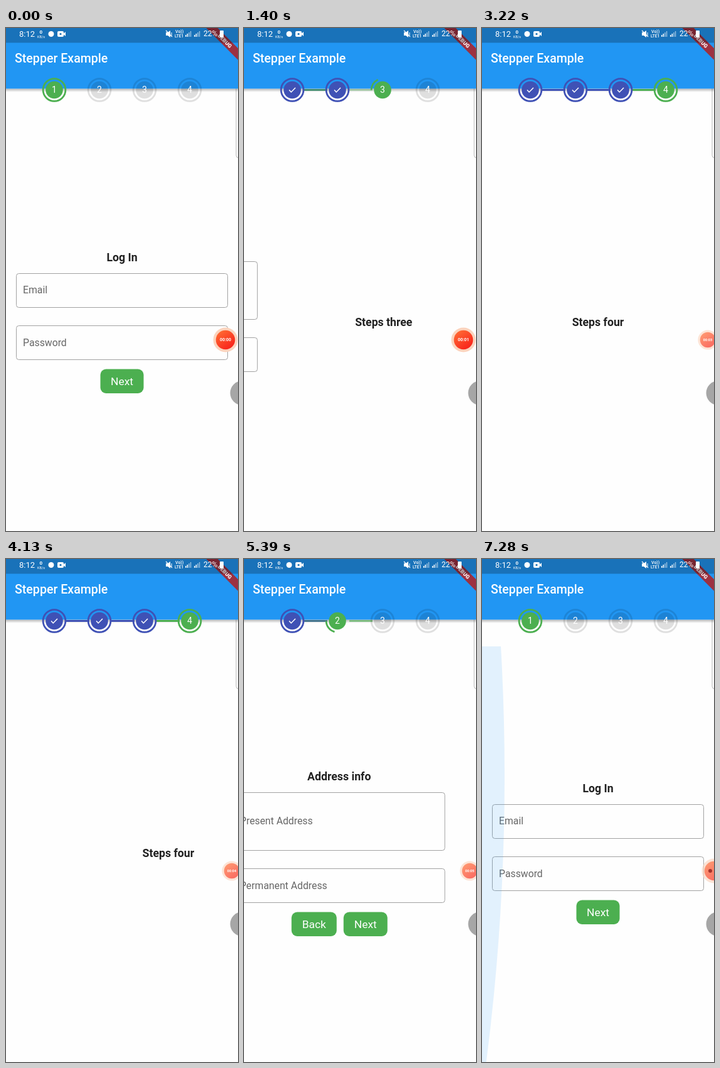
Write an HTML page with a canvas that moves like this. It is 370 px wide and 800 px high and loops after 7350 ms.

```html
<!DOCTYPE html>
<html lang="en">
<head>
<meta charset="utf-8">
<title>Stepper Example</title>
<style>
html, body { margin: 0; width: 100%; height: 100%; overflow: hidden; background: #fefefe; }
canvas { display: block; width: 370px; height: 800px; }
</style>
</head>
<body>
<canvas id="stage"></canvas>
<script>
const W = 370, H = 800, LOOP = 7350, STEP = 70;
const GREEN = '#4caf50', INDIGO = '#3f51b5', BLUE = '#2196f3', IDLE = 'rgba(0,0,0,.12)';
const STEP_Y = 98.5, RING_TIME = 550, LINE_TIME = 300, DRAG_TIME = 250;

// Page swipes: time the halfway point is passed, direction, settling constant
const swipes = [
  [615, 1, 22], [1300, 1, 63], [2030, 1, 63],
  [4222, -1, 63], [5275, -1, 67], [6080, -1, 80]
];
// Overscroll glows: start, time to peak, fade time, on the right edge
const glows = [[2430, 330, 400, true], [3200, 330, 400, true], [6960, 320, 500, false]];

const canvas = document.getElementById('stage');
const c = canvas.getContext('2d');
const dpr = window.devicePixelRatio || 1;
canvas.width = W * dpr;
canvas.height = H * dpr;

const clamp = x => Math.max(0, Math.min(1, x));
const smooth = x => { x = clamp(x); return x * x * (3 - 2 * x); };

function text(s, x, y, size, weight = 400, color = '#fff', align = 'left') {
  c.font = `${weight} ${size}px Roboto, sans-serif`;
  c.fillStyle = color;
  c.textAlign = align;
  c.fillText(s, x, y + size * 0.355);
}

function rect(x, y, w, h, color) {
  c.fillStyle = color;
  c.fillRect(x, y, w, h);
}

function disc(x, y, r, color) {
  c.fillStyle = color;
  c.beginPath();
  c.arc(x, y, r, 0, 7);
  c.fill();
}

function path(points, color, width) {
  c.beginPath();
  points.forEach(([x, y]) => c.lineTo(x, y));
  if (width) {
    c.strokeStyle = color;
    c.lineWidth = width;
    c.stroke();
  } else {
    c.fillStyle = color;
    c.fill();
  }
}

function box(x, y, w, h, r) {
  c.beginPath();
  c.roundRect(x, y, w, h, r);
}

function heading(s, y) {
  text(s, 185, y, 17.7, 700, '#212121', 'center');
}

function field(label, y, h, labelY) {
  c.strokeStyle = '#a2a2a2';
  c.lineWidth = 1;
  box(16.5, y + 0.5, 337, h, 4);
  c.stroke();
  text(label, 27, labelY, 15.8, 400, '#666');
}

function button(label, x, y, w) {
  c.fillStyle = GREEN;
  box(x, y, w, 38.5, 9);
  c.fill();
  text(label, x + w / 2, y + 19, 17.4, 400, '#fff', 'center');
}

const pages = [
  () => {
    heading('Log In', 365);
    field('Email', 390, 54, 416);
    field('Password', 473, 54, 500);
    button('Next', 150.5, 542.5, 69);
  },
  () => {
    heading('Address info', 346);
    field('Present Address', 371, 92, 416);
    field('Permanent Address', 492, 54, 519);
    button('Back', 109, 561.5, 72);
    button('Next', 192, 561.5, 70);
  },
  () => heading('Steps three', 468),
  () => heading('Steps four', 468)
];

function pagePosition(t) {
  return swipes.reduce((pos, [mid, dir, tau]) => {
    const part = t < mid
      ? 0.5 * clamp((t - mid + DRAG_TIME) / DRAG_TIME) ** 2
      : 1 - 0.5 * Math.exp((mid - t) / tau);
    return pos + dir * part;
  }, 0);
}

function drawPages(t) {
  const pos = pagePosition(t);
  pages.forEach((page, i) => {
    const x = (i - pos) * W;
    if (Math.abs(x) >= W) return;
    c.save();
    c.translate(x, 0);
    page();
    c.restore();
  });
}

function drawGlow(t) {
  for (const [start, rise, fade, right] of glows) {
    const age = t - start;
    const k = age < rise ? smooth(age / rise) : 1 - smooth((age - rise) / fade);
    if (age <= 0 || k <= 0) continue;
    c.save();
    c.beginPath();
    c.rect(0, 139, W, H - 139);
    c.clip();
    if (right) {
      c.translate(W, 0);
      c.scale(-1, 1);
    }
    c.scale(k, 1);
    disc(36 - 3557, 345, 3557, `rgba(33,150,243,${0.125 * k})`);
    c.restore();
  }
}

function drawStatus() {
  rect(0, 0, W, 23.5, 'rgba(0,0,0,.24)');
  text('8:12', 21, 9, 13);
  text('0', 53.5, 6, 8, 700);
  text('KB/s', 50, 14, 5.5);
  disc(72, 9.5, 4.5, '#fff');
  c.fillStyle = '#fff';
  box(82, 5, 10, 9, 2);
  c.fill();
  path([[91, 9.5], [95, 6], [95, 13]], '#fff');
  disc(87, 9.5, 1.6, '#1a72b5');
  path([[255, 7], [258, 7], [262, 4], [262, 15], [258, 12], [255, 12]], '#fff');
  path([[255, 4], [265, 14]], '#fff', 1.2);
  path([[264, 7], [264, 12]], '#fff', 1);
  text('Vo))', 270, 6, 7, 500);
  text('LTE1', 269, 13, 6.5, 500);
  for (const x of [286, 300])
    for (let i = 0; i < 4; i++)
      rect(x + i * 2.6, 11 - i * 2, 1.5, 3 + i * 2, i < 2 ? '#fff' : 'rgba(255,255,255,.55)');
  text('22%', 315, 9, 12);
  c.fillStyle = '#fff';
  box(341, 4, 6, 11, 1);
  c.fill();
}

function drawBanner() {
  c.save();
  c.translate(349, 20.5);
  c.rotate(Math.PI / 4);
  rect(-50, -6.5, 100, 13, 'rgba(170,38,46,.9)');
  text('DEBUG', 0, 0, 8.5, 900, '#fff', 'center');
  c.restore();
}

function drawBar() {
  c.strokeStyle = '#b8b8b8';
  c.lineWidth = 1;
  box(367, 90, 20, 116.5, 4);
  c.stroke();

  const shade = c.createLinearGradient(0, 96.5, 0, 102);
  shade.addColorStop(0, 'rgba(0,0,0,.28)');
  shade.addColorStop(1, 'rgba(0,0,0,0)');
  rect(0, 96.5, W, 5.5, shade);
  rect(0, 0, W, 96.5, BLUE);
  text('Stepper Example', 14, 48, 19.6, 500);
  drawBanner();
  drawStatus();
}

// Colour of a connecting line as [r, g, b, a]
function lineColor(line, step) {
  if (step <= line) return [76, 175, 80, 0];
  return step === line + 1 ? [76, 175, 80, 1] : [63, 81, 181, 1];
}

function ring(x, color, from, sweep) {
  c.strokeStyle = color;
  c.lineWidth = 2.8;
  c.beginPath();
  c.arc(x, STEP_Y, 17.9, from, from + sweep, sweep < 0);
  c.stroke();
}

function drawStepper(t) {
  let step = 0, prev = 0, since = -1e4, dir = 1;
  for (const [mid, d] of swipes) {
    if (t < mid) break;
    prev = step;
    step += d;
    since = mid;
    dir = d;
  }
  const mix = clamp((t - since) / LINE_TIME);
  const sweep = dir * Math.PI * 2 * clamp((t - since) / RING_TIME);

  for (let i = 0; i < 4; i++) {
    const x = 77 + i * 72;
    if (i < 3) {
      const a = lineColor(i, prev), b = lineColor(i, step);
      rect(x + 19, 97, 37, 3, `rgba(${a.map((v, k) => v + (b[k] - v) * mix)})`);
    }
    const color = i < step ? INDIGO : i === step ? GREEN : IDLE;
    ring(x, color, Math.PI, i === step ? sweep : Math.PI * 2);
    disc(x, STEP_Y, 13.8, color);
    if (i < step)
      path([[x - 5, 98.5], [x - 1.8, 102], [x + 5, 95]], '#fff', 1.5);
    else
      text(i + 1, x, STEP_Y, 14, 400, '#fff', 'center');
  }
}

function drawBubbles(t) {
  disc(377, 580.5, 19.5, '#a6a6a6');

  // The recorder bubble shrinks and fades when idle, then docks at the edge
  const dim = smooth((t - 1500) / 200), dock = smooth((t - 6450) / 250);
  c.save();
  c.translate(350 + 10 * dim + 10 * dock, 496);
  const size = 1 - 0.2 * (dim - dock);
  c.scale(size, size);
  c.globalAlpha = 1 - 0.38 * dim;
  disc(0, 0, 19.5, '#fbd3bd');
  const fill = c.createLinearGradient(-10, -14, 10, 14);
  fill.addColorStop(0, '#ff6a33');
  fill.addColorStop(1, '#f8201a');
  disc(0, 0, 15.3, fill);
  c.globalAlpha = 1;
  if (dock > 0.5)
    disc(-6, 0, 3, '#a5332b');
  else
    text('00:0' + Math.floor(t / 1000 + 0.5), 0, 0, 7, 700, '#fff', 'center');
  c.restore();
}

function draw(t) {
  c.setTransform(dpr, 0, 0, dpr, 0, 0);
  rect(0, 0, W, H, '#fefefe');
  drawPages(t);
  drawGlow(t);
  drawBar();
  drawStepper(t);
  drawBubbles(t);
}

const begin = performance.now();
function tick() {
  const t = (performance.now() - begin) % LOOP;
  draw(Math.floor(t / STEP) * STEP);
  requestAnimationFrame(tick);
}
tick();
</script>
</body>
</html>
```
